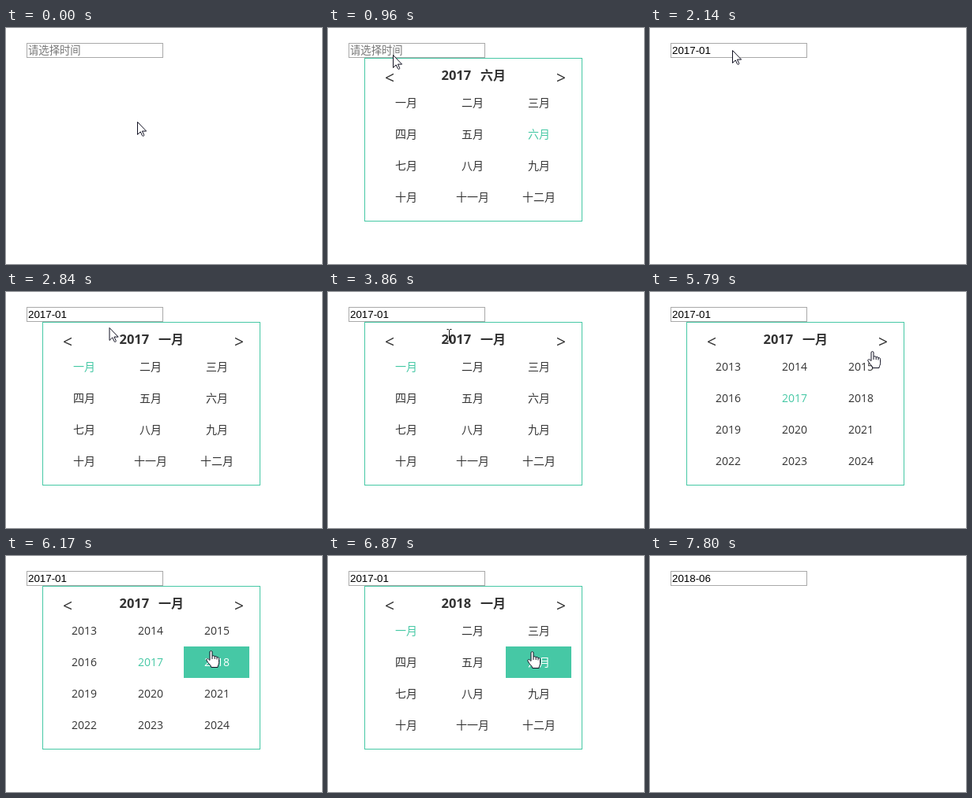
An HTML page that plays this animation: 400x300 px, repeating every 8730 ms.

```html
<!DOCTYPE html>
<html lang="zh-CN">
<head>
<meta charset="utf-8">
<title>Month picker</title>
<style>
  html, body { margin: 0; width: 100%; height: 100%; overflow: hidden; background: #fff; }
  svg { display: block; width: 400px; height: 300px; }
  text { font: 14px "Open Sans", "Noto Sans CJK SC", "Noto Sans CJK", sans-serif; fill: #333; }
  .cjk { font-family: "Noto Sans CJK SC", "Noto Sans CJK", sans-serif; }
  .mid { text-anchor: middle; }
  #value { font: 13.333px "Liberation Sans", Arial, sans-serif; fill: #000; }
  #hint { font-size: 13.333px; fill: #757575; }
  #year { font-size: 16.5px; font-weight: 700; }
  #month { font-size: 16px; font-weight: 700; }
  .nav { font-size: 21px; }
  .frame { fill: #fff; stroke: #46c8a5; }
  .cell rect { fill: none; }
  .cell.on text { fill: #46c8a5; }
  .cell.hover rect { fill: #46c8a5; }
  .cell.hover text { fill: #fff; }
  .pointer path { fill: #fff; stroke: #112; stroke-linejoin: round; }
  #beam path { fill: none; stroke: #111; }
</style>
</head>
<body>
<svg viewBox="0 0 400 300">
  <rect x="26.5" y="19.5" width="172" height="18" fill="#fff" stroke="#a9a9a9"/>
  <text id="hint" class="cjk" x="28" y="33">请选择时间</text>
  <text id="value" x="28" y="33"></text>
  <g id="popup">
    <rect class="frame" x="46.5" y="38.5" width="275" height="207"/>
    <text class="nav mid" x="78" y="71">&lt;</text>
    <text class="nav mid" x="295" y="71">&gt;</text>
    <text id="year" x="143.5" y="66"></text>
    <text id="month" class="cjk" x="193" y="66"></text>
    <g id="cells"></g>
  </g>
  <g id="arrow" class="pointer">
    <path d="M.5 .5V16.5L4.2 12.9 6.5 17.8C7.2 19 9.3 18.2 8.7 16.8L6.4 12.1H11.6Z"/>
  </g>
  <g id="hand" class="pointer">
    <g transform="translate(-6 0)">
      <path d="M5 12.5V2C5 .1 8 .1 8 2V7.5C8.6 6.3 11.2 6.5 11.2 8 12 7 14 7.4 14 9 15 8.2 16.6 8.8 16.6 10.3V15.5C16.6 18 15 19 15 21.5H6.8C6.8 19 3.2 17 1 12.8 0 11 2.2 10 3.5 11.2Z"/>
      <path d="M8 7.5V11M11.2 8V11M14 9V11.5"/>
    </g>
  </g>
  <g id="beam"><path d="M-3 -7.5H-1L0 -6.5 1 -7.5H3M0 -6.5V6.5M-3 7.5H-1L0 6.5 1 7.5H3"/></g>
</svg>
<script>
const LOOP = 8730;
const $ = id => document.getElementById(id);
const months = [..."一二三四五六七八九十", "十一", "十二"].map(m => m + "月");

// Pointer moves: start, end, steps, x, y, first step is a click without motion
const moves = [
  [70, 490, 6, 79.5, 29],
  [640, 640, 1, 82, 28],
  [960, 960, 1, 82, 34],
  [1040, 1270, 4, 138, 97],
  [1670, 2140, 7, 104, 28, true],
  [2370, 2590, 4, 157, 37, true],
  [2760, 3070, 5, 82, 59],
  [3390, 3860, 7, 153.5, 55],
  [4110, 4560, 7, 79, 60, true],
  [4790, 5330, 8, 295, 60, true],
  [5560, 5790, 4, 281, 75, true],
  [5860, 6170, 4, 259, 120],
  [6870, 6870, 1, 258, 121],
  [7250, 7250, 1, 257, 121],
  [7570, 7720, 3, 308, 253]
];

const ease = p => p * p * (3 - 2 * p);
const within = (t, a, b) => t >= a && t < b;

function pointerAt(t) {
  let x = 166, y = 119;
  for (const [start, end, n, tx, ty, click] of moves) {
    if (t < start) break;
    const k = n > 1 ? Math.min(n - 1, Math.floor((t - start) / (end - start) * (n - 1) + 1e-6)) : 0;
    const p = ease(click ? k / (n - 1) : (k + 1) / n);
    x += (tx - x) * p;
    y += (ty - y) * p;
  }
  return [Math.round(x * 2) / 2, Math.round(y)];
}

function pointerKind(t, x, y, open) {
  if (t >= 7800) return "";
  if (!open) return t < 640 && y < 38 ? "beam" : "arrow";
  if (y >= 70 || (y > 50 && (x < 81 || x > 285))) return "hand";
  return y > 50 && x >= 144 && x <= 225 ? "beam" : "arrow";
}

function svg(tag, attrs, parent) {
  const el = document.createElementNS("http://www.w3.org/2000/svg", tag);
  for (const name in attrs) el.setAttribute(name, attrs[name]);
  return parent.appendChild(el);
}

const cells = months.map((_, i) => {
  const x = 57 + i % 3 * 84, y = 75 + Math.floor(i / 3) * 40;
  const g = svg("g", {}, $("cells"));
  svg("rect", { x, y, width: 83, height: 40 }, g);
  const label = svg("text", { class: "mid", x: x + 42, y: y + 25 }, g);
  return { g, label, x, y };
});

const show = (id, on) => { $(id).style.display = on ? "" : "none"; };
const write = (el, s) => { if (el.textContent !== s) el.textContent = s; };

function draw(t) {
  const open = within(t, 640, 1670) || within(t, 2370, 7250);
  const pickYear = within(t, 4110, 6490);
  const first = within(t, 4790, 5560) ? 2001 : 2013;
  const year = t < 6490 ? 2017 : 2018;
  const month = t < 1670 ? 5 : 0;
  const [x, y] = pointerAt(t);
  const kind = pointerKind(t, x, y, open);

  show("hint", t < 1670);
  write($("value"), t < 1670 ? "" : t < 7250 ? "2017-01" : "2018-06");
  show("popup", open);
  write($("year"), String(year));
  write($("month"), months[month]);

  cells.forEach((c, i) => {
    const on = pickYear ? first + i === year : i === month;
    const hover = y > 78 && x >= c.x && x < c.x + 84 && y >= c.y && y < c.y + 40;
    write(c.label, pickYear ? String(first + i) : months[i]);
    c.g.setAttribute("class", "cell" + (on ? " on" : "") + (hover ? " hover" : ""));
  });

  for (const id of ["arrow", "hand", "beam"]) {
    show(id, id === kind);
    $(id).setAttribute("transform", `translate(${x} ${y})`);
  }
}

const began = performance.now();
function tick() {
  draw((performance.now() - began) % LOOP);
  requestAnimationFrame(tick);
}
tick();
</script>
</body>
</html>
```
